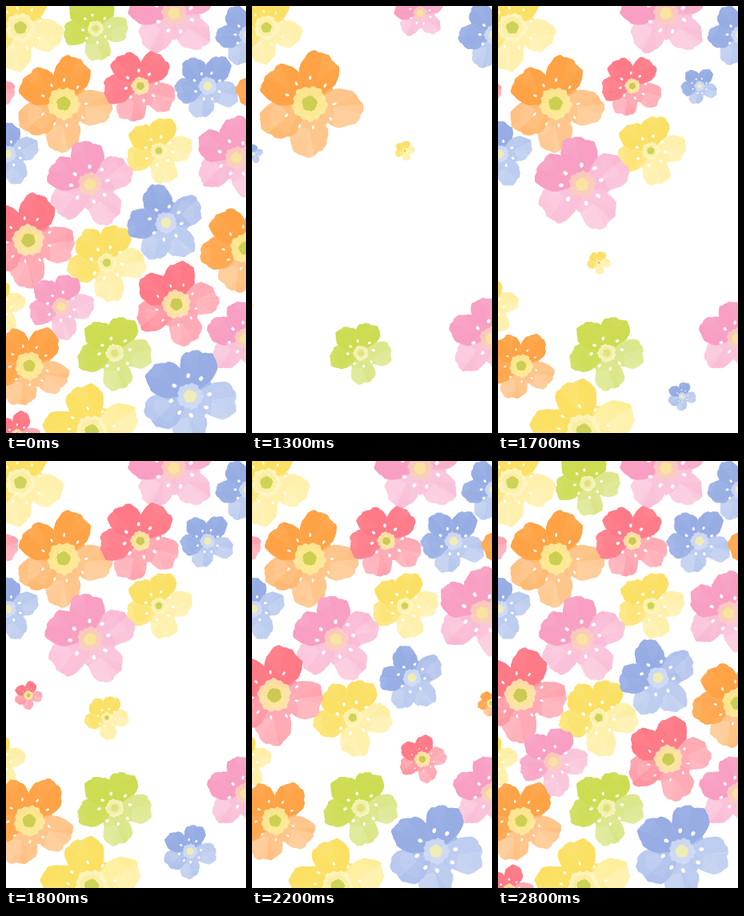
Recreate the animation shown at these times as an HTML page with a canvas. Size 300x534 px, loop 2.9 s.

```html
<!DOCTYPE html>
<html lang="en">
<head>
<meta charset="utf-8">
<title>Popping flowers</title>
<style>
  html, body { margin: 0; height: 100%; overflow: hidden; background: #fff; }
  canvas { display: block; width: 100vw; height: 100vh; }
</style>
</head>
<body>
<canvas id="stage" width="300" height="534"></canvas>
<script>
const ctx = document.getElementById('stage').getContext('2d');
const LOOP = 2900, STEP = 100, RAD = Math.PI / 180;
const PETALS = [0, 60, 122, 194, 276];
const HALF_WIDTH = 38 * RAD;

const COLOURS = {
  orange: { dark: '#ffa346', light: '#ffc68c', halo: '#fcf0a0', core: '#c8cc4c' },
  red:    { dark: '#ff7a87', light: '#ffabb5', halo: '#fdedb0', core: '#c4c64c' },
  yellow: { dark: '#fbe064', light: '#fff1ad', halo: '#fdf7c8', core: '#c8cf50' },
  green:  { dark: '#cddc50', light: '#dde78c', halo: '#f7f7cc', core: '#dce07c' },
  blue:   { dark: '#97ade4', light: '#bdcdf0', halo: '#d3def6', core: '#f3eeb0' },
  pink:   { dark: '#f89fc3', light: '#fbc6dc', halo: '#fad0bc', core: '#f8e69a' },
};

// colour, x, y, radius, direction of the first petal, time of appearance
const FLOWERS = [
  ['orange', 72, 122, 61, 92, 1000],
  ['blue', 302, 36, 40, 115, 1000],
  ['pink', 299, 416, 49, 140, 1000],
  ['yellow', 18, 27, 55, 100, 1100],
  ['green', 136, 434, 48, 168, 1100],
  ['pink', 210, 9, 57, 130, 1200],
  ['yellow', 191, 181, 43, 160, 1300],
  ['blue', 2, 185, 40, 150, 1300],
  ['yellow', -8, 376, 33, 150, 1300],
  ['pink', 105, 223, 56, 142, 1400],
  ['yellow', 107, 532, 61, 64, 1400],
  ['red', 168, 100, 48, 112, 1500],
  ['red', -30, 108, 42, 166, 1500],
  ['orange', 29, 450, 53, 110, 1500],
  ['blue', 252, 100, 42, 108, 1600],
  ['yellow', 126, 321, 50, 168, 1700],
  ['blue', 230, 488, 61, 92, 1700],
  ['orange', 338, 105, 51, 115, 1700],
  ['red', 28, 293, 60, 92, 1800],
  ['pink', 288, 190, 53, 148, 1900],
  ['blue', 200, 271, 50, 55, 2000],
  ['red', 213, 373, 54, 155, 2100],
  ['orange', 299, 303, 57, 110, 2200],
  ['green', 112, 28, 42, 168, 2300],
  ['pink', 69, 376, 42, 165, 2400],
  ['red', 14, 536, 30, 92, 2400],
];

function seeded(seed) {
  return () => {
    seed = (seed * 16807) % 2147483647;
    return seed / 2147483647;
  };
}

function fill(colour, alpha = 1) {
  ctx.globalAlpha = alpha;
  ctx.fillStyle = colour;
  ctx.fill();
  ctx.globalAlpha = 1;
}

// Wedge of a petal between u = from and u = to, where the petal spans -1..1
function wedge(angle, wave, from, to, inner, outer) {
  ctx.beginPath();
  ctx.moveTo(inner * Math.cos(angle), inner * Math.sin(angle));
  for (let i = 0; i <= 30; i++) {
    const u = from + (to - from) * i / 30;
    const ripple = 0.03 * Math.sin(5 * u + wave) + 0.018 * Math.sin(13 * u + 2 * wave)
      + 0.008 * Math.sin(29 * u + wave);
    const r = outer * (0.97 - 0.42 * Math.abs(u) ** 2.6 + ripple);
    const a = angle + u * HALF_WIDTH;
    ctx.lineTo(r * Math.cos(a), r * Math.sin(a));
  }
  ctx.closePath();
}

function blob(radius, wave, colour, alpha) {
  ctx.beginPath();
  for (let i = 0; i < 60; i++) {
    const a = i * 6 * RAD;
    const r = radius * (1 + 0.05 * Math.sin(5 * a + wave) + 0.05 * Math.sin(13 * a + wave));
    ctx.lineTo(r * Math.cos(a), r * Math.sin(a));
  }
  fill(colour, alpha);
}

function drawPetal(angle, { dark, light }, random) {
  const wave = random() * 6.3;
  const tone = Math.min(1, Math.max(0, 0.36 + 1.3 * Math.cos(angle + 118 * RAD)));
  const [own, other] = tone > 0.5 ? [dark, light] : [light, dark];
  wedge(angle, wave, -1, 1, 0, 1);
  fill(light);
  fill(dark, tone);
  const start = random() * 0.9 - 0.8;
  wedge(angle, wave, start, start + 0.6, 0.4, 1);
  fill(other, 0.15);
  wedge(angle, wave, -0.7, 0.3 + random() * 0.4, 0.2, 0.8);
  fill(own, 0.4);
  if (tone < 0.5) {
    wedge(angle, wave, -0.2, 0.95, 0.45, 1);
    fill('#fff', 0.15);
  }
}

// Fills the gaps between the petals near the centre
function drawBase({ dark, light }) {
  const wash = ctx.createLinearGradient(-0.2, -0.4, 0.2, 0.4);
  wash.addColorStop(0, dark);
  wash.addColorStop(1, light);
  blob(0.54, 0, wash);
}

function drawEye(name, radius, random) {
  const { halo, core } = COLOURS[name];
  const soft = name === 'blue' || name === 'pink';
  const large = !soft && radius > 50;
  const wave = random() * 6;
  const size = large ? 0.32 : soft ? 0.26 : 0.23;
  blob(size, wave, halo, 0.85);
  if (!soft) blob(size * 0.72, wave + 1, '#fbe988', 0.5);
  blob(large ? 0.14 : soft ? 0.13 : 0.1, wave + 2, core, 0.9);

  const count = large ? 9 : 8;
  for (let i = 0; i < count; i++) {
    const a = (i + 0.3 * random()) * 2 * Math.PI / count + wave;
    const r = (large ? 0.44 : 0.38) + 0.05 * random();
    ctx.beginPath();
    ctx.ellipse(r * Math.cos(a), r * Math.sin(a), large ? 0.04 : 0.05,
      large ? 0.023 : 0.038, a + random() - 0.5, 0, 7);
    fill('#fff');
  }
}

function drawFlower([name, x, y, radius, turn], index, scale) {
  const random = seeded(7919 * (index + 3));
  const colours = COLOURS[name];
  ctx.save();
  ctx.translate(x, y);
  ctx.scale(radius * scale, radius * scale);
  drawBase(colours);
  for (const offset of PETALS) drawPetal((turn + offset) * RAD, colours, random);
  drawEye(name, radius, random);
  ctx.restore();
}

// Grow from 0.3 to 1.1 in three steps, then settle at 1 in two more
function popScale(age) {
  if (age < 0) return 0;
  if (age <= 300) return 0.3 + 0.8 * age / 300;
  return Math.max(1, 1.1 - 0.1 * (age - 300) / 200);
}

let lastTime = -1;
function frame(now) {
  const time = Math.floor((now % LOOP) / STEP) * STEP;
  if (time !== lastTime) {
    lastTime = time;
    ctx.fillStyle = '#fff';
    ctx.fillRect(0, 0, 300, 534);
    FLOWERS.forEach((flower, i) => {
      const scale = time < 1000 ? 1 : popScale(time - flower[5]);
      if (scale > 0) drawFlower(flower, i, scale);
    });
  }
  requestAnimationFrame(frame);
}
frame(0);
</script>
</body>
</html>
```
